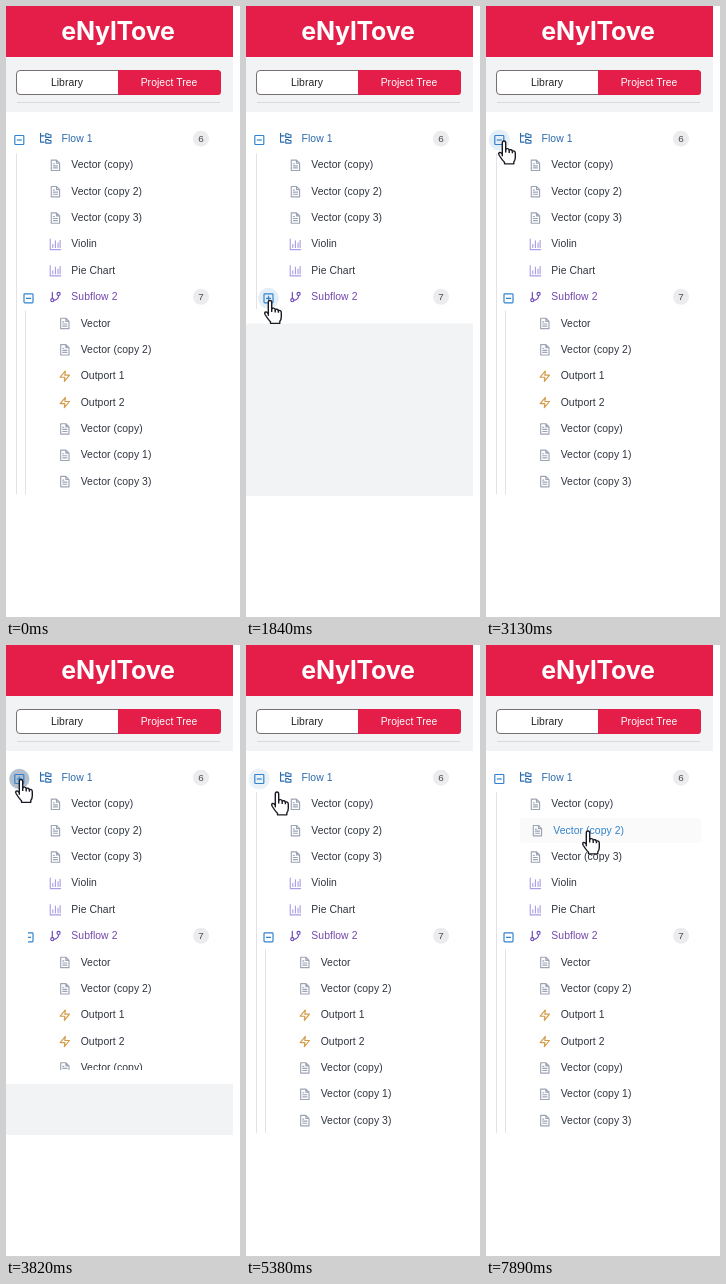
These frames come from a looping animation (234 by 611 pixels, 8000 ms). An HTML page:

```html
<!DOCTYPE html>
<html lang="en">
<head>
<meta charset="utf-8">
<title>Project tree</title>
<style>
  html, body { margin: 0; width: 100%; height: 100%; overflow: hidden; background: #fff; }
  svg { display: block; }
  text { font: 10.4px "Liberation Sans", Arial, sans-serif; letter-spacing: .06px; fill: #2f343e; }
  .title { font: 700 25px Inter, sans-serif; letter-spacing: -.2px; fill: #fff; }
  .mid { text-anchor: middle; }
  .icon { fill: none; stroke-linecap: round; stroke-linejoin: round; }
  .hot text { fill: #3182ce; }
</style>
</head>
<body>
<svg id="stage" width="234" height="611" viewBox="0 0 234 611">
  <clipPath id="page"><rect width="227" height="490"/></clipPath>
  <clipPath id="flowClip"><rect id="flowBox" width="227"/></clipPath>
  <clipPath id="subClip"><rect id="subBox" width="227"/></clipPath>
  <rect width="234" height="611" fill="#fff"/>
  <g clip-path="url(#page)">
    <rect width="227" height="490" fill="#f2f3f5"/>
    <rect width="227" height="51" fill="#e41e48"/>
    <text class="title mid" x="112" y="33.500">eNylTove</text>
    <rect x="10.500" y="64.500" width="204" height="24" rx="3.500" fill="#fff" stroke="#776f73"/>
    <path d="M112 64H211.500a3.500 3.500 0 0 1 3.500 3.500V85.500a3.500 3.500 0 0 1-3.500 3.500H112z" fill="#e41e48"/>
    <text class="mid" x="61" y="79.500" style="fill:#222">Library</text>
    <text class="mid" x="163" y="79.500" style="fill:#fff">Project Tree</text>
    <path d="M11 96.500H214" stroke="#dadbe0"/>
    <rect id="sheet" y="106" width="227" fill="#fff"/>
    <g id="tree">
      <g id="flow" clip-path="url(#flowClip)">
        <g id="sub" clip-path="url(#subClip)"></g>
      </g>
    </g>
  </g>
  <g id="cursor" stroke="#1a1a24" stroke-width="1.4" stroke-linejoin="round" fill="#fff">
    <g id="hand" transform="scale(1 .95)">
      <path d="M-1.7 15.500V2Q-1.700 0 0 0T1.700 2V9Q2 7.800 3.600 8T5.200 10Q5.600 8.800 7 9.200T8.400 11Q9 10 10.200 10.600T11.300 13V17Q11.300 20 9.800 22V24H.5V22.300Q-1.500 20.500-4.800 15Q-6 12.600-4.300 12Q-3 11.800-1.700 14Z"/>
      <path d="M1.700 9V12M5.200 10V12.500M8.400 11V13" fill="none"/>
    </g>
    <path id="arrow" d="M0 0V16L3.700 12.500L6.200 18.300L8.700 17.200L6.200 11.600H11.300Z"/>
  </g>
</svg>
<script>
const LOOP = 8000, TOP = 132.2, PITCH = 26.36;
const $ = id => document.getElementById(id);
const rowY = i => TOP + i * PITCH;
const clamp = v => Math.max(0, Math.min(1, v));
const smooth = p => p * p * (3 - 2 * p);

function add(parent, tag, attrs, text) {
  const el = document.createElementNS('http://www.w3.org/2000/svg', tag);
  set(el, attrs);
  if (text) el.textContent = text;
  parent.append(el);
  return el;
}
function set(el, attrs) {
  for (const k in attrs) el.setAttribute(k, attrs[k]);
}

// Icons on a 24 unit grid: [path, colour]
const ICONS = {
  tree: ['M2 1V18H9M2 6H9M12 2V9H22V4H18L16 2ZM12 13V20H22V15H18L16 13Z', '#2b6cb0'],
  file: ['M14 2H4V22H20V8ZM14 2V8H20M8 9H10M8 13H16M8 17H16', '#9ca3b4'],
  bars: ['M2 2V22H22M7 12V18M12 5V18M17 9V18M21 4V18', '#a89fe6'],
  branch: ['M6 3V15M18 9A9 9 0 0 1 9 18M21 6A3 3 0 1 1 15 6A3 3 0 1 1 21 6M9 18A3 3 0 1 1 3 18A3 3 0 1 1 9 18', '#6b46b4'],
  bolt: ['M13 2L3 14H12L11 22L21 10H12Z', '#d59b48']
};

const rows = [];
function addRow(parent, icon, label, x, color) {
  const y = rowY(rows.length);
  const back = add(parent, 'rect', { x: x - 10, y: y - 12, width: 225 - x, height: 25, rx: 3, fill: '#fafafa' });
  const g = add(parent, 'g', {});
  const [d, stroke] = ICONS[icon];
  add(g, 'path', { d, stroke, class: 'icon', 'stroke-width': 2.2,
    transform: `translate(${x - .8} ${y - 5.5}) scale(.52)` });
  const text = add(g, 'text', { x: x + 21.3, y: y + 3.8 }, label);
  if (color) text.style.fill = color;
  rows.push({ g, back, y, x, parent });
}

function addBadge(parent, i, n) {
  add(parent, 'rect', { x: 187, y: rowY(i) - 7.5, width: 16, height: 16, rx: 8, fill: '#ececee' });
  add(parent, 'text', { x: 195, y: rowY(i) + 3.6, class: 'mid', style: 'font-size:9.8px;fill:#4a4a4e' }, n);
}

function addToggle(parent, x, y) {
  const halo = add(parent, 'circle', { cx: x, cy: y, r: 10.5, fill: '#e4eef6' });
  const ripple = add(parent, 'circle', { cx: x, cy: y, fill: '#4a5a70' });
  add(parent, 'rect', { x: x - 4.5, y: y - 4.5, width: 9, height: 9, rx: .8, fill: 'none', stroke: '#3182ce', 'stroke-width': 1.2 });
  add(parent, 'path', { d: `M${x - 2.5} ${y}h5`, stroke: '#3182ce', 'stroke-width': 1.2 });
  const plus = add(parent, 'path', { d: `M${x} ${y - 2.5}v5`, stroke: '#3182ce', 'stroke-width': 1.2 });
  return { halo, ripple, plus };
}

const tree = $('tree'), flow = $('flow'), sub = $('sub');
const flowTop = rowY(.5), subTop = rowY(6.5), subHeight = 7 * PITCH;

const flowLine = add(flow, 'path', { stroke: '#e2e3e8' });
add(sub, 'path', { d: `M19.500 ${subTop + 1}V488`, stroke: '#e2e3e8' });
addRow(tree, 'tree', 'Flow 1', 34.3, '#2b6cb0');
for (const s of ['', ' 2', ' 3']) addRow(flow, 'file', `Vector (copy${s})`, 44);
addRow(flow, 'bars', 'Violin', 44);
addRow(flow, 'bars', 'Pie Chart', 44);
addRow(flow, 'branch', 'Subflow 2', 44, '#7448ad');
addRow(sub, 'file', 'Vector', 53.4);
addRow(sub, 'file', 'Vector (copy 2)', 53.4);
addRow(sub, 'bolt', 'Outport 1', 53.4);
addRow(sub, 'bolt', 'Outport 2', 53.4);
for (const s of ['', ' 1', ' 3']) addRow(sub, 'file', `Vector (copy${s})`, 53.4);
addBadge(tree, 0, 6);
addBadge(flow, 6, 7);

// Each node closes and reopens once; halo runs while hovered
const flowNode = { ...addToggle(tree, 13.3, 134), close: 3753, open: 4618, clicks: [3670, 4540], hover: [3000, 5460] };
const subNode = { ...addToggle(flow, 22.5, 292.3), close: 1293, open: 2078, clicks: [1210, 2000], hover: [940, 2720] };

// Pointer stops: [ms, x, y]
const PATH = [
  [230, 207, 598], [960, 24, 294.5], [2600, 24, 294.5], [3130, 18, 135],
  [3540, 18, 135], [3610, 15, 134.5], [5310, 15, 134.5], [5380, 31, 147],
  [5870, 88, 162], [6600, 88, 162], [6670, 89, 163], [7150, 102, 186]
];

function pointer(t) {
  const i = PATH.findIndex(k => k[0] > t);
  if (i < 0) return PATH[PATH.length - 1].slice(1);
  if (i === 0) return [-50, -50];
  const [t0, x0, y0] = PATH[i - 1], [t1, x1, y1] = PATH[i];
  const p = smooth((t - t0) / (t1 - t0));
  return [x0 + (x1 - x0) * p, y0 + (y1 - y0) * p];
}

// cubic-bezier(.4, 0, .2, 1)
function ease(p) {
  let lo = 0, hi = 1, u = p;
  for (let i = 0; i < 16; i++) {
    u = (lo + hi) / 2;
    const x = 1.2 * u * (1 - u) ** 2 + .6 * u * u * (1 - u) + u ** 3;
    if (x < p) lo = u; else hi = u;
  }
  return u * u * (3 - 2 * u);
}

function openness(n, t) {
  const phase = start => clamp((t - start) / 300);
  return 1 - ease(phase(n.close)) + ease(phase(n.open));
}

function drawToggle(n, t) {
  const [from, to] = n.hover;
  n.halo.style.opacity = clamp((t - from) / 120) * clamp((to - t) / 100);
  const click = n.clicks.find(c => t >= c && t < c + 500);
  const age = click === undefined ? 500 : t - click;
  set(n.ripple, { r: 10 * clamp(.3 + age / 180), opacity: .32 * clamp((500 - age) / 260) });
  n.plus.style.display = t >= n.close && t < n.open ? '' : 'none';
}

// Overflow is cut on the left only while a group is moving
function clipGroup(box, top, height, open, left) {
  const moving = open > .001 && open < .999;
  set(box, { x: moving ? left : 0, y: top, height: Math.max(0, height) });
}

function draw(t) {
  const so = openness(subNode, t), fo = openness(flowNode, t);
  const subH = subHeight * so;
  const flowH = (6 * PITCH + subH) * fo;
  const bottom = flowTop + flowH;
  clipGroup($('subBox'), subTop, subH, so, 32);
  clipGroup($('flowBox'), flowTop, flowH, fo, 22);
  set($('sheet'), { height: Math.min(490, bottom + 14) - 106 });
  set(flowLine, { d: `M10.500 ${flowTop + 2}V${flowTop + 6 * PITCH + subH}` });
  drawToggle(flowNode, t);
  drawToggle(subNode, t);

  const [x, y] = pointer(t);
  for (const r of rows) {
    const limit = r.parent === sub ? Math.min(bottom, subTop + subH) : r.parent === flow ? bottom : 490;
    const hot = Math.abs(y - r.y) < PITCH / 2 && x > r.x - 10 && x < 215 && y < limit;
    r.back.style.display = hot ? '' : 'none';
    set(r.g, { class: hot ? 'hot' : '', transform: `translate(${hot ? 2 : 0} 0)` });
  }
  set($('cursor'), { transform: `translate(${x.toFixed(1)} ${y.toFixed(1)})` });
  $('hand').style.display = y < 490 ? '' : 'none';
  $('arrow').style.display = y < 490 ? 'none' : '';
}

const start = performance.now();
function tick(now) {
  draw(Math.max(0, now - start) % LOOP);
  requestAnimationFrame(tick);
}
draw(0);
requestAnimationFrame(tick);
</script>
</body>
</html>
```
